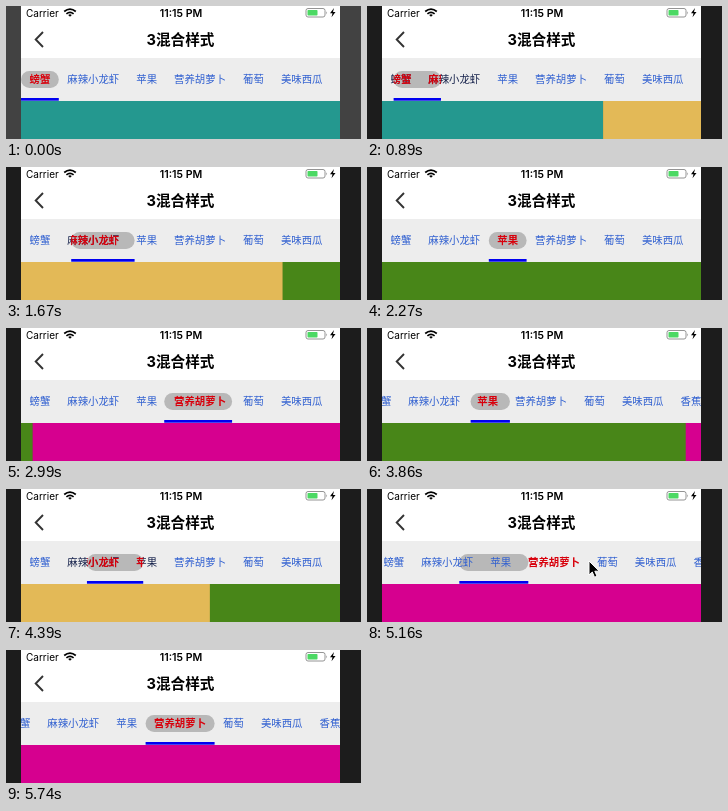
An HTML page for the animation above (6090 ms loop, 355 by 133 pixels).

```html
<!DOCTYPE html>
<html lang="zh">
<head>
<meta charset="utf-8">
<style>
html, body { margin: 0; width: 100%; height: 100%; overflow: hidden; }
svg { display: block; width: 355px; height: 133px; }
text { font-family: Inter, "Noto Sans CJK SC", "Noto Sans CJK", sans-serif; white-space: pre; }
#base, #lit { font: 10.4px "Noto Sans CJK SC", "Noto Sans CJK", sans-serif; }
#base text, #lit text { font-family: inherit; }
#lit { font-weight: bold; fill: #d8000c; }
</style>
</head>
<body>
<svg viewBox="0 0 355 133">
  <defs>
    <clipPath id="screen"><rect x="15" width="319" height="133"/></clipPath>
    <clipPath id="litClip"><rect id="litBox" y="60" height="30"/></clipPath>
  </defs>
  <rect id="desk" width="355" height="133"/>
  <g clip-path="url(#screen)">
    <rect x="15" width="319" height="52" fill="#fff"/>
    <rect x="15" y="52" width="319" height="43" fill="#ededed"/>

    <text x="20" y="10.6" font-size="10">Carrier</text>
    <g fill="none" stroke="#000" stroke-width="1.7">
      <path d="M58.2 5.5Q64 .6 69.8 5.5M60.4 7.8Q64 4.8 67.6 7.8"/>
      <path d="M62.2 8.9Q64 7.6 65.8 8.9L64 10.8Z" fill="#000" stroke="none"/>
    </g>
    <text x="175" y="10.6" font-size="10.6" font-weight="600" text-anchor="middle">11:15 PM</text>
    <rect x="300" y="2.5" width="19" height="8.5" rx="2" fill="none" stroke="#888" stroke-width=".9"/>
    <rect x="301.5" y="4" width="10" height="5.5" rx=".8" fill="#4cd964"/>
    <path d="M320.3 5.2q1.6 1.6 0 3.2z" fill="#888"/>
    <path d="M328 2l-4 5.3h2.5l-1 4 4-5.4h-2.5z"/>
    <path d="M37 26l-7.3 7.5 7.3 7.5" fill="none" stroke="#333" stroke-width="1.9"/>
    <text x="174.5" y="38.7" font-size="14.6" font-weight="bold" text-anchor="middle">3混合样式</text>

    <g id="pages"></g>
    <g id="tabs">
      <rect id="pill" y="65" height="17" rx="8.5" fill="#b8b8b8"/>
      <rect id="line" y="92" height="2.7" fill="#0000f0"/>
      <g id="base"></g>
      <g clip-path="url(#litClip)"><g id="lit"></g></g>
    </g>
  </g>
  <path id="cursor" d="M0 0V14L3.3 11 5.5 16.2 8 15.2 5.8 10.2H10.3Z" stroke="#fff" stroke-width="1"/>
</svg>
<script>
const LOOP = 6090, WIDTH = 319, CLICK = 5050;
const $ = id => document.getElementById(id);
const names = ['螃蟹', '麻辣小龙虾', '苹果', '营养胡萝卜', '葡萄', '美味西瓜', '香蕉'];
const colors = ['#24988f', '#e3b957', '#488618', '#d6008f'];

function add(parent, tag, attrs, text = '') {
  const el = document.createElementNS('http://www.w3.org/2000/svg', tag);
  for (const k in attrs) el.setAttribute(k, attrs[k]);
  el.textContent = text;
  return $(parent).appendChild(el);
}

colors.forEach((fill, i) =>
  add('pages', 'rect', { x: 15 + i * WIDTH, y: 95, width: WIDTH + .3, height: 38, fill }));

let left = 23.5;
const tabs = names.map(name => {
  const x = left, end = x + name.length * 10.4;
  left = end + 17;
  add('lit', 'text', { x, y: 77.4 }, name);
  return { x, end, cell: [x - 8.5, end + 8.5], el: add('base', 'text', { x, y: 77.4 }, name) };
});

// Screen refreshes: [first, last, count]
const bursts = [[0, 0, 1], [830, 890, 2], [1130, 1430, 6], [1670, 1790, 3], [1970, 2270, 6],
  [2450, 2510, 2], [2810, 3410, 11], [3460, 4040, 10], [4100, 4690, 11], [4750, 4870, 3],
  [CLICK, 5330, 6], [5510, 5740, 5]];

// Swipes: [drag start, drag end, release, from, held at, to]
const swipes = [[770, 890, 1070, 0, .307, 1], [1610, 1790, 1910, 1, 1.41, 2],
  [2390, 2510, 2750, 2, 2.35, 3], [3410, 3636, 3636, 3, 2.6, 2], [4150, 4350, 4350, 2, 1.7, 1]];

const clamp = v => Math.min(1, Math.max(0, v));
const mix = (a, b, u) => a + (b - a) * u;
function ease(t, a, b) {
  const u = clamp((t - a) / (b - a));
  return u * u * (3 - 2 * u);
}

function refreshTime(t) {
  const [a, b, n] = bursts.filter(s => s[0] <= t).pop();
  if (t >= b) return b;
  const step = (b - a) / (n - 1);
  return a + Math.floor((t - a) / step + .15) * step;
}

function pageAt(t) {
  if (t >= CLICK) return 3;
  const swipe = swipes.filter(s => s[0] <= t).pop();
  if (!swipe) return 0;
  const [start, end, release, from, held, to] = swipe;
  if (t < release) return mix(from, held, clamp((t - start) / (end - start)) ** .75);
  const rest = (held - to) * Math.exp(-.012 * (t - release));
  return Math.abs(rest) < .014 ? to : to + rest;
}

const between = (a, b, u) => tabs[a].cell.map((v, i) => mix(v, tabs[b].cell[i], u));

function span(el, [a, b]) {
  el.setAttribute('x', a);
  el.setAttribute('width', b - a);
}

function move(el, x, y) {
  el.setAttribute('transform', `translate(${x} ${y})`);
}

function draw(t) {
  const page = pageAt(t), i = Math.floor(page), clicked = t >= CLICK;
  const bar = clicked ? between(1, 3, ease(t, 5034, 5314)) : between(i, i + 1, page - i);
  const lit = clicked ? tabs[3].cell : bar;
  const scroll = 20 * (ease(t, 3110, 3400) - ease(t, 3990, 4270) + ease(t, CLICK, 5330));

  $('desk').setAttribute('fill', t < 830 ? '#424242' : '#1c1c1c');
  move($('pages'), -page * WIDTH, 0);
  move($('tabs'), -scroll, 0);
  span($('pill'), bar);
  span($('line'), bar);
  span($('litBox'), lit);
  for (const { x, end, el } of tabs) {
    const touched = lit[0] < end && lit[1] > x;
    const covered = lit[0] <= x && lit[1] >= end;
    el.setAttribute('fill', covered ? 'none' : touched ? '#14204a' : '#2f5fd0');
  }

  const rise = ease(t, 4700, 4870), exit = ease(t, 5460, 5740);
  $('cursor').setAttribute('visibility', t >= 4750 && t < 5740 ? 'visible' : 'hidden');
  move($('cursor'), 222 + 133 * exit, 82 - 10 * rise + 50 * exit);
}

const began = performance.now();
function tick() {
  draw(refreshTime((performance.now() - began) % LOOP));
  requestAnimationFrame(tick);
}
tick();
</script>
</body>
</html>
```
